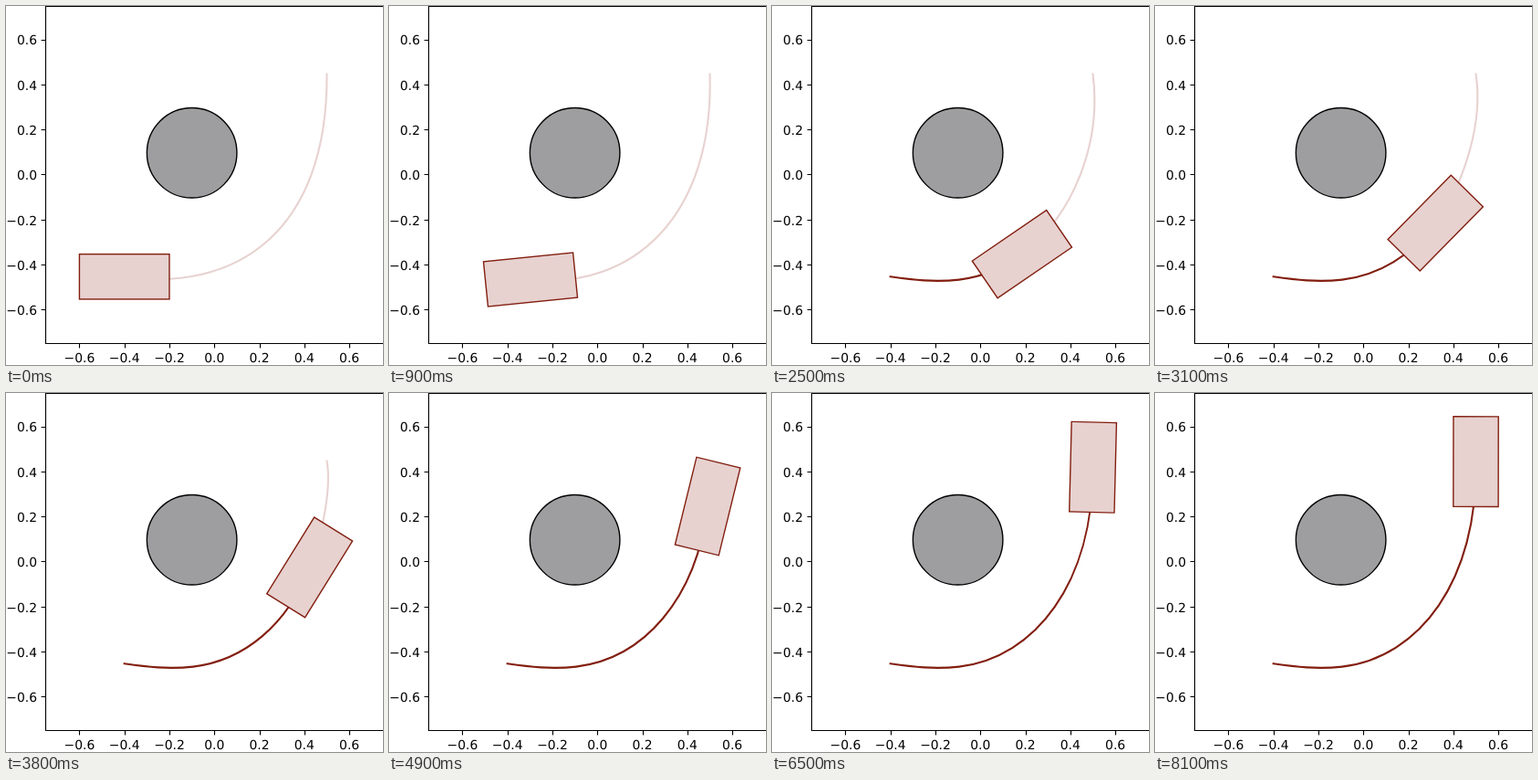
An HTML page for the animation above (8200 ms loop, 413 by 393 pixels).

```html
<!DOCTYPE html>
<html lang="en">
<head>
<meta charset="utf-8">
<title>Planned motion around an obstacle</title>
<style>
  html, body { margin: 0; width: 100%; height: 100%; overflow: hidden; background: #fff; }
  svg { display: block; }
  text { font: 13.89px "DejaVu Sans", sans-serif; text-rendering: geometricPrecision; }
  .axis { fill: none; stroke: #000; stroke-width: 1.11; }
  .path { fill: none; stroke-width: 2.08; stroke-linecap: square; }
  #plan { stroke: #e7d2d0; }
  #trail { stroke: #821e0f; }
  #body { fill: #e7d2d0; stroke: #821e0f; stroke-width: 1.4; }
  #obstacle { fill: #9e9ea0; stroke: #000; stroke-width: 1.4; }
</style>
</head>
<body>
<svg width="413" height="393" viewBox="0 0 413 393">
  <circle id="obstacle"/>
  <path id="plan" class="path"/>
  <path id="trail" class="path"
        d="M129.7 296.3C154 299.8 178 302.6 205 299.6C290 289.4 354 205 351.5 74.5"/>
  <rect id="body"/>
  <g id="axes"><path class="axis" d="M413 .5H43.5V369.5H413"/></g>
</svg>
<script>
const STEP = 100, COUNT = 82;
const UNIT = 246.4, X0 = 228.28, Y0 = 185.42;
const RAMP = 1.3;
const px = x => X0 + x * UNIT, py = y => Y0 - y * UNIT;
const $ = id => document.getElementById(id);

function set(el, attrs) {
  for (const key in attrs) el.setAttribute(key, attrs[key]);
  return el;
}

function add(name, attrs, text = "") {
  const el = document.createElementNS("http://www.w3.org/2000/svg", name);
  el.textContent = text;
  $("axes").append(set(el, attrs));
}

set($("obstacle"), { cx: px(-0.1), cy: py(0.1), r: 0.2 * UNIT });
set($("body"), { x: -0.2 * UNIT, y: -0.1 * UNIT, width: 0.4 * UNIT, height: 0.2 * UNIT });

for (let i = -3; i <= 3; i++) {
  const label = (i < 0 ? "\u2212" : "") + (Math.abs(i) / 5).toFixed(1);
  const x = px(i / 5), y = py(i / 5);
  const tx = Math.round(x) + 0.5, ty = Math.round(y) - 0.5;
  add("path", { class: "axis", d: `M${tx} 369.5v4.9M43.5 ${ty}h-4.9` });
  add("text", { x, y: 390, "text-anchor": "middle" }, label);
  add("text", { x: 34, y: Math.round(y + 4.9), "text-anchor": "end" }, label);
}

// Distance left after t seconds: speed ramps up, then fades as v * (1 - exp(-left / soft)).
function left(total, v, soft, t) {
  const eff = t < RAMP ? t * t / (2 * RAMP) : t - RAMP / 2;
  return Math.min(total, soft * Math.log1p(Math.expm1(total / soft) * Math.exp(-v * eff / soft)));
}

const trail = $("trail"), length = trail.getTotalLength();
const goal = trail.getPointAtLength(length);

function draw(t) {
  const rest = left(length, 82, 54, t), done = length - rest;
  const angle = 90 - left(90, 18.6, 10, t);
  const p = trail.getPointAtLength(done), q = trail.getPointAtLength(done + 1);

  set($("body"), { transform: `translate(${p.x} ${p.y}) rotate(${-angle})` });
  set(trail, { "stroke-dasharray": `${done} ${2 * length}` });

  // The plan leaves along the trail and bulges outward before the goal.
  const f = rest / length, reach = 0.33 * rest;
  const hx = goal.x + 1 + 60 * f * f * (1 - f);
  const hy = goal.y + rest * (0.14 + 0.33 * f);
  set($("plan"), {
    d: `M${p.x} ${p.y}C${p.x + (q.x - p.x) * reach} ${p.y + (q.y - p.y) * reach} ` +
       `${hx} ${hy} ${goal.x} ${goal.y}`
  });
}

const start = performance.now();
function tick() {
  const n = Math.floor((performance.now() - start) / STEP) % COUNT;
  draw(n * STEP / 1000);
  requestAnimationFrame(tick);
}
tick();
</script>
</body>
</html>
```
